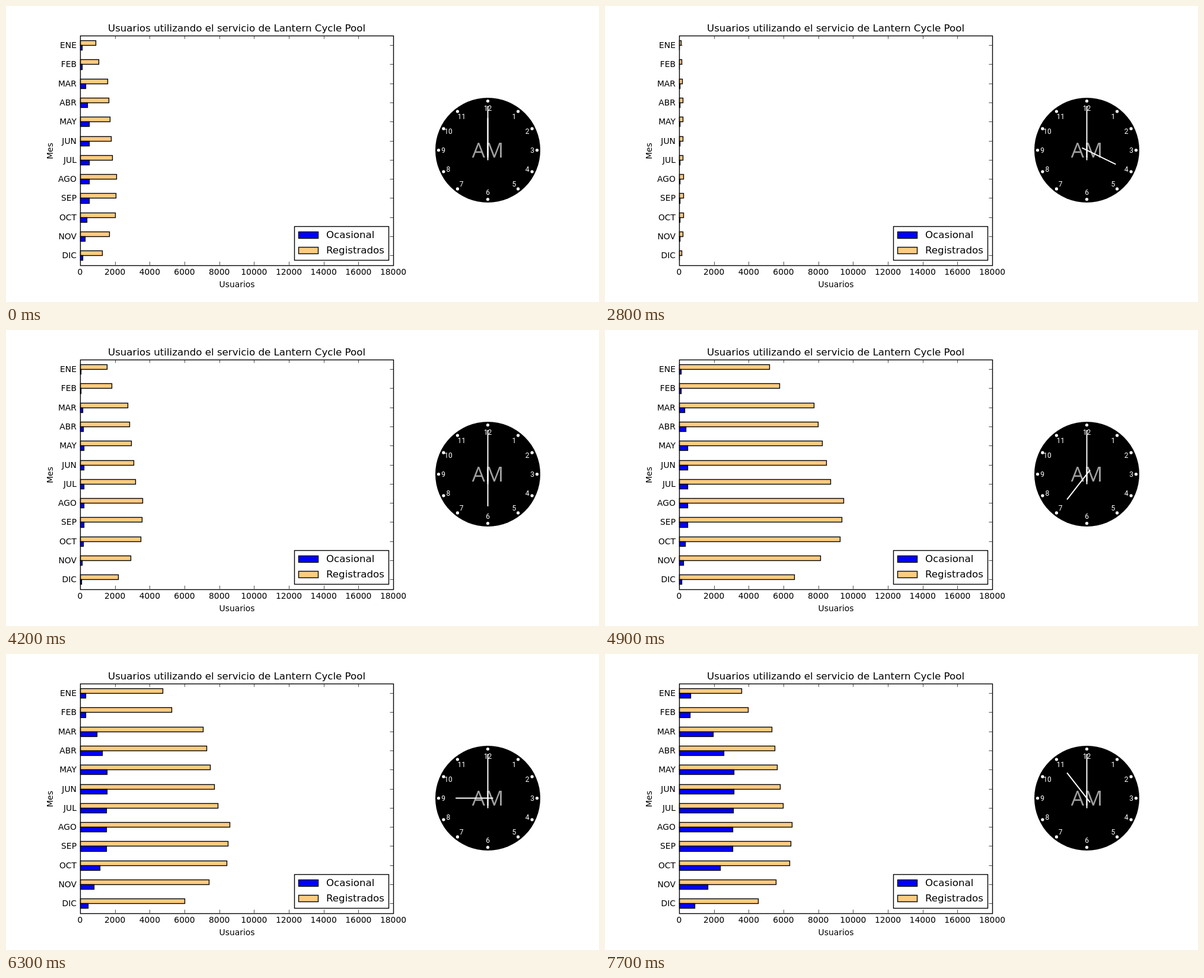
These frames come from a looping animation (1000x500 px, 8 s). An HTML page with a canvas:

```html
<!DOCTYPE html>
<html lang="es">
<head>
<meta charset="utf-8">
<style>
  html, body { margin: 0; width: 100%; height: 100%; overflow: hidden; background: #fff; }
  canvas { display: block; }
</style>
</head>
<body>
<canvas id="stage" width="1000" height="500"></canvas>
<script>
const ctx = document.getElementById('stage').getContext('2d');
const LOOP = 8000, STEP = 700;
const BLUE = '#0000ff', ORANGE = '#ffcc80', SANS = '"DejaVu Sans", sans-serif';
const plot = { left: 125, right: 653, top: 50, bottom: 437.5 };
const rowHeight = (plot.bottom - plot.top) / 12;
const months = 'ENE FEB MAR ABR MAY JUN JUL AGO SEP OCT NOV DIC'.split(' ');
const dial = { x: 812.5, y: 243.5, r: 88.5 };

// Linear interpolation through [x, value] points.
function interpolate(points, x) {
  const next = Math.max(1, points.findIndex(point => point[0] >= x));
  const [x0, v0] = points[next - 1], [x1, v1] = points[next];
  return v0 + (v1 - v0) * (x - x0) / (x1 - x0);
}
const logPoints = points => points.map(([x, v]) => [x, Math.log(v)]);

// Bar length = level of the hour (August, in pixels) times weight of the month.
const registered = {
  levels: logPoints([[0, 61], [2, 24], [4, 7], [6, 105], [7, 277], [8, 452], [9, 252], [10, 172], [11, 190]]),
  season: [[0, 0.55], [1, 0.61], [2, 0.82], [6, 0.92], [7, 1], [9, 0.98], [10, 0.86], [11, 0.7]],
  contrast: hour => hour < 7 ? 1.4 : 1   // seasons differ more at night
};
const casual = {
  levels: logPoints([[0, 14.5], [4, 1.2], [8, 30], [11, 88]]),
  season: [[0, 0.22], [1, 0.2], [2, 0.65], [4, 1.05], [8, 1.02], [11, 0.3]],
  contrast: () => 1
};
function barLength({ levels, season, contrast }, hour, month) {
  return Math.exp(interpolate(levels, hour)) * interpolate(season, month) ** contrast(hour);
}

const snap = v => Math.round(v) + 0.5;

function text(string, x, y, size, align = 'center', color = '#000', family = SANS) {
  ctx.font = `${size}px ${family}`;
  ctx.textAlign = align;
  ctx.fillStyle = color;
  ctx.fillText(string, x, y);
}
function line(x1, y1, x2, y2, width, color = '#000') {
  ctx.strokeStyle = color;
  ctx.lineWidth = width;
  ctx.beginPath();
  ctx.moveTo(x1, y1);
  ctx.lineTo(x2, y2);
  ctx.stroke();
}
function box(x1, y1, x2, y2, fill = 'transparent') {
  const rect = [snap(x1), snap(y1), snap(x2) - snap(x1), snap(y2) - snap(y1)];
  ctx.fillStyle = fill;
  ctx.fillRect(...rect);
  ctx.strokeStyle = '#000';
  ctx.lineWidth = 1.39;
  ctx.strokeRect(...rect);
}
function disc(x, y, r, color) {
  ctx.fillStyle = color;
  ctx.beginPath();
  ctx.arc(x, y, r, 0, 2 * Math.PI);
  ctx.fill();
}

function drawChart(hour) {
  const { left, right, top, bottom } = plot, tick = 5.6, thin = 0.7;
  months.forEach((month, i) => {
    const y = top + (i + 0.5) * rowHeight, h = rowHeight / 4;
    box(left, y - h, left + barLength(registered, hour, i), y, ORANGE);
    box(left, y, left + barLength(casual, hour, i), y + h, BLUE);
    line(left, snap(y), left + tick, snap(y), thin);
    line(right - tick, snap(y), right, snap(y), thin);
    text(month, 119, Math.round(y) + 5, 13.89, 'right');
  });
  for (let i = 0; i <= 9; i++) {
    const x = left + (right - left) * i / 9;
    line(snap(x), top, snap(x), top + tick, thin);
    line(snap(x), bottom - tick, snap(x), bottom, thin);
    text(i * 2000, x, 454, 13.89);
  }
  box(left, top, right, bottom);
  text('Usuarios utilizando el servicio de Lantern Cycle Pool', 389, 43, 16.67);
  text('Usuarios', 389.5, 475, 13.89);
  ctx.save();
  ctx.translate(79, 245);
  ctx.rotate(-Math.PI / 2);
  text('Mes', 0, 0, 13.89);
  ctx.restore();

  box(486, 372, 645, 429, '#fff');
  [['Ocasional', BLUE], ['Registrados', ORANGE]].forEach(([label, color], i) => {
    const y = 381 + 26 * i;
    box(493, y, 526, y + 11, color);
    text(label, 540, y + 11, 16.67, 'left');
  });
}

// The hours are not evenly spaced: they crowd towards 3 and 9.
function dialPoint(hour, radius) {
  const even = hour * Math.PI / 6;
  const angle = even + 0.121 * Math.sin(2 * even) + 0.04 * Math.sin(4 * even);
  return [dial.x + radius * Math.sin(angle), dial.y - radius * Math.cos(angle)];
}

function drawClock(hour) {
  disc(dial.x, dial.y, dial.r, '#000');
  for (let h = 1; h <= 12; h++) {
    const [x, y] = dialPoint(h, 75 - 4 * Math.cos(h * Math.PI / 6) ** 2);
    disc(...dialPoint(h, 83), 2.6, '#fff');
    text(h, x, y + 4.5, 12, 'center', '#fff', 'Roboto, sans-serif');
  }
  text('AM', dial.x, 256, 35, 'center', '#a0a0a0', '"Open Sans", sans-serif');
  line(...dialPoint(hour, -9), ...dialPoint(hour, 54.3), 2, '#fff');
  line(...dialPoint(0, -17), ...dialPoint(0, 74.5), 2, '#fff');
}

function draw(now) {
  const hour = Math.floor(now % LOOP / STEP);
  ctx.fillStyle = '#fff';
  ctx.fillRect(0, 0, 1000, 500);
  drawChart(hour);
  drawClock(hour);
}
const start = performance.now();
function frame() {
  draw(performance.now() - start);
  requestAnimationFrame(frame);
}
frame();
</script>
</body>
</html>
```
